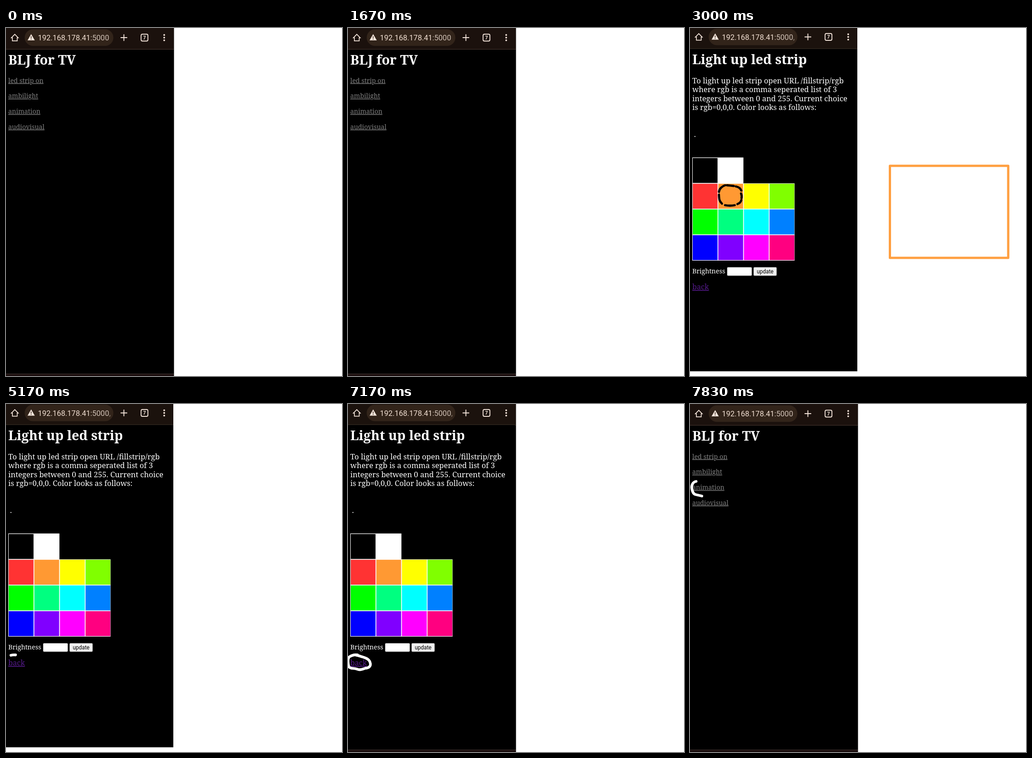
Write an HTML page that moves like this. It is 737 px wide and 760 px high and loops after 8000 ms.

```html
<!DOCTYPE html>
<html lang="en">
<head>
<meta charset="utf-8">
<title>LED strip remote</title>
<style>
  html, body { margin: 0; width: 100%; height: 100%; overflow: hidden; background: #fff; }
  svg { display: block; width: 737px; height: 760px; }
  text { font-family: "Noto Serif", serif; fill: #fff; white-space: pre; }
  .ui { font-family: Roboto, sans-serif; }
  .title { font-size: 28.85px; font-weight: bold; }
  .link { font-size: 14.27px; fill: #808080; text-decoration: underline; }
  .body { font-size: 16.55px; }
  .back { font-size: 16.2px; fill: #551a8b; text-decoration: underline; }
  .address { font-size: 16.5px; fill: #f1dfd2; }
  .count { font-size: 10.5px; font-weight: bold; fill: #f3e4da; }
  .button { font-size: 11.9px; fill: #000; }
  .box { stroke: #767676; rx: 2px; }

  /* The loop has 48 ticks; the small lead keeps every change on time */
  #menu, #picker, #lit, .pen { animation: 8s step-end -4ms infinite; }
  #menu { animation-name: menu; }
  #picker { animation-name: picker; }
  #lit { animation-name: lit; }
  @keyframes menu { 0% { opacity: 1 } 22.917% { opacity: 0 } 66.667%, 100% { opacity: 1 } }
  @keyframes picker { 0% { opacity: 0 } 22.917% { opacity: 1 } 91.667%, 100% { opacity: 0 } }
  @keyframes lit { 0% { opacity: 0 } 37.5% { opacity: 1 } 64.583%, 100% { opacity: 0 } }

  /* Hand-drawn strokes grow in steps; an offset of 110 hides them */
  .pen {
    fill: none; stroke: #fff; stroke-width: 5.8; stroke-linecap: round; stroke-linejoin: round;
    stroke-dasharray: 100 300; stroke-dashoffset: 110;
  }
  #pen-led { animation-name: pen-led; }
  #pen-color { animation-name: pen-color; stroke-width: 14; stroke-linecap: butt; }
  #pen-back { animation-name: pen-back; }
  #pen-anim { animation-name: pen-anim; }
  @keyframes pen-led {
    0% { stroke-dashoffset: 110 }
    6.25% { stroke-dashoffset: 100; animation-timing-function: steps(7, jump-start) }
    20.833% { stroke-dashoffset: 0; animation-timing-function: step-start }
    20.84%, 100% { stroke-dashoffset: 110 }
  }
  @keyframes pen-color {
    0% { stroke-dashoffset: 110 }
    25% { stroke-dashoffset: 100; animation-timing-function: steps(6, jump-start) }
    37.5% { stroke-dashoffset: 0 }
    64.583%, 100% { stroke-dashoffset: 110 }
  }
  @keyframes pen-back {
    0% { stroke-dashoffset: 110 }
    64.583% { stroke-dashoffset: 100; animation-timing-function: steps(13, jump-start) }
    91.667% { stroke-dashoffset: 0; animation-timing-function: step-start }
    91.67%, 100% { stroke-dashoffset: 110 }
  }
  @keyframes pen-anim {
    0% { stroke-dashoffset: 110 }
    91.667% { stroke-dashoffset: 100; animation-timing-function: steps(4, jump-start) }
    100% { stroke-dashoffset: 0 }
  }
</style>
</head>
<body>
<svg viewBox="0 0 737 760">
  <defs>
    <g id="bar">
      <rect x="41" y="3" width="194.5" height="36" rx="18" fill="#32241a"/>
      <g fill="none" stroke="#f3e4da" stroke-width="1.9">
        <path d="M11.8 21.3 19.3 13.8 26.8 21.3H24.6V28.2H14V21.3Z" stroke-width="1.7"/>
        <path d="M251.3 21H265.9M258.6 13.7V28.3"/>
        <rect x="296.3" y="13.5" width="15" height="15" rx="3"/>
      </g>
      <g fill="#f3e4da">
        <path d="M47.3 27 55.2 13.3 63.1 27Z"/>
        <circle cx="347" cy="15.2" r="1.9"/>
        <circle cx="347" cy="21" r="1.9"/>
        <circle cx="347" cy="26.8" r="1.9"/>
      </g>
      <path d="M55.2 18V22.2M55.2 23.6V25.2" stroke="#32241a" stroke-width="1.5"/>
      <text class="ui count" x="303.8" y="24.8" text-anchor="middle">7</text>
    </g>
    <mask id="reveal" maskUnits="userSpaceOnUse" x="50" y="330" width="80" height="70">
      <path id="pen-color" class="pen" pathLength="100"
        d="M80 343C70 344 62 352 62 364C62 380 72 388 88 388C106 388 114 378 114 366C114 352 104 343 78 343.5"/>
    </mask>
  </defs>

  <g id="menu">
    <rect width="368.5" height="760"/>
    <rect width="368" height="46" fill="#1b110d"/>
    <rect y="46" width="368" height="1" fill="#4b3a32"/>
    <rect y="755" width="368" height="1" fill="#4b3a36"/>
    <rect y="756" width="368" height="4" fill="#1a0d0e"/>
    <use href="#bar"/>
    <text class="ui address" x="70" y="27.3">192.168.178.41<tspan fill="#cfc0b5">:5000</tspan></text>
    <text class="title" x="5" y="80">BLJ for TV</text>
    <text class="link" x="5" y="119.7">led strip on</text>
    <text class="link" x="5" y="153.4">ambilight</text>
    <text class="link" x="5" y="187.1">animation</text>
    <text class="link" x="5" y="220.8">audiovisual</text>
  </g>

  <g id="picker">
    <rect width="367" height="749.7"/>
    <rect width="367" height="44.5" fill="#1b120d"/>
    <rect y="44.5" width="367" height="1" fill="#4b3d2e"/>
    <use href="#bar" y="-1.5"/>
    <text class="ui address" x="70" y="25.8">192.168.178.41<tspan fill="#cfc0b5">:5000</tspan><tspan fill="#8d8074">,</tspan></text>
    <text class="title" x="5" y="78.5">Light up led strip</text>
    <g class="body">
      <text x="5" y="120.6">To light up led strip open URL /fillstrip/rgb</text>
      <text x="5" y="140.1">where rgb is a comma seperated list of 3</text>
      <text x="5" y="159.7">integers between 0 and 255. Current choice</text>
      <text x="5" y="179.2">is rgb=0,0,0. Color looks as follows:</text>
      <text x="8.7" y="238.4">.</text>
    </g>
    <text class="back" x="5" y="571.3">back</text>
    <path fill="#fff" d="M5 282.8H117.2V339.2H229.4V508H5Z"/>
    <g id="swatches"></g>
    <text x="5" y="535.7" font-size="14.27">Brightness</text>
    <rect class="box" x="81.5" y="522.5" width="54" height="18.5" fill="#fff"/>
    <rect class="box" x="139.5" y="522.5" width="50.5" height="18.5" fill="#efefef"/>
    <text class="ui button" x="164.8" y="536" text-anchor="middle">update</text>
    <g mask="url(#reveal)">
      <path fill="none" stroke="#000" stroke-width="4.8" stroke-linecap="round"
        d="M63.5 358C64 351 71 345 77 343.5M63.5 364C64 371 63 377 70 383.5M77 387Q88 389 98 387M104 384.5Q111 382 112.5 376M113 371.5Q114 366 112 361.5M112.5 355Q110 348 100.5 346M81 343.5Q88 344 96 345"/>
    </g>
  </g>

  <rect id="lit" x="438.5" y="301" width="259.5" height="201" fill="none" stroke="#ff9f40" stroke-width="5" stroke-linejoin="round"/>

  <path id="pen-led" class="pen" pathLength="100"
    d="M10 96C3 102 2 112 3 120C4 131 20 133 45 133C75 133 94 130 94 114C94 98 75 94 45 94C28 94 16 94 8 97"/>
  <path id="pen-back" class="pen" pathLength="100"
    d="M21 548C13 547 6 550 2 553C-1 558 0 568 2 574C6 579 12 576 20 579C26 582 32 579 38 577C45 577 50 573 49 567C48 558 40 555 34 553C28 552 24 549 18 548.5"/>
  <path id="pen-anim" class="pen" pathLength="100"
    d="M13.5 169C6 170 3 178 4 184C5 191 7 197 13 198C18 199 22 200 26 201"/>
</svg>
<script>
  const rows = [
    ["#000", "#fff"],
    ["#f33", "#f93", "#ff0", "#80ff00"],
    ["#0f0", "#00ff80", "#0ff", "#0080ff"],
    ["#00f", "#8000ff", "#f0f", "#ff0080"],
  ];
  const pitch = 56.15, size = 54.4;
  const swatch = (fill, col, row) =>
    `<rect x="${6 + col * pitch}" y="${284 + row * pitch}" width="${size}" height="${size}" fill="${fill}"/>`;
  document.getElementById("swatches").innerHTML =
    rows.map((row, r) => row.map((fill, c) => swatch(fill, c, r)).join("")).join("");
</script>
</body>
</html>
```
